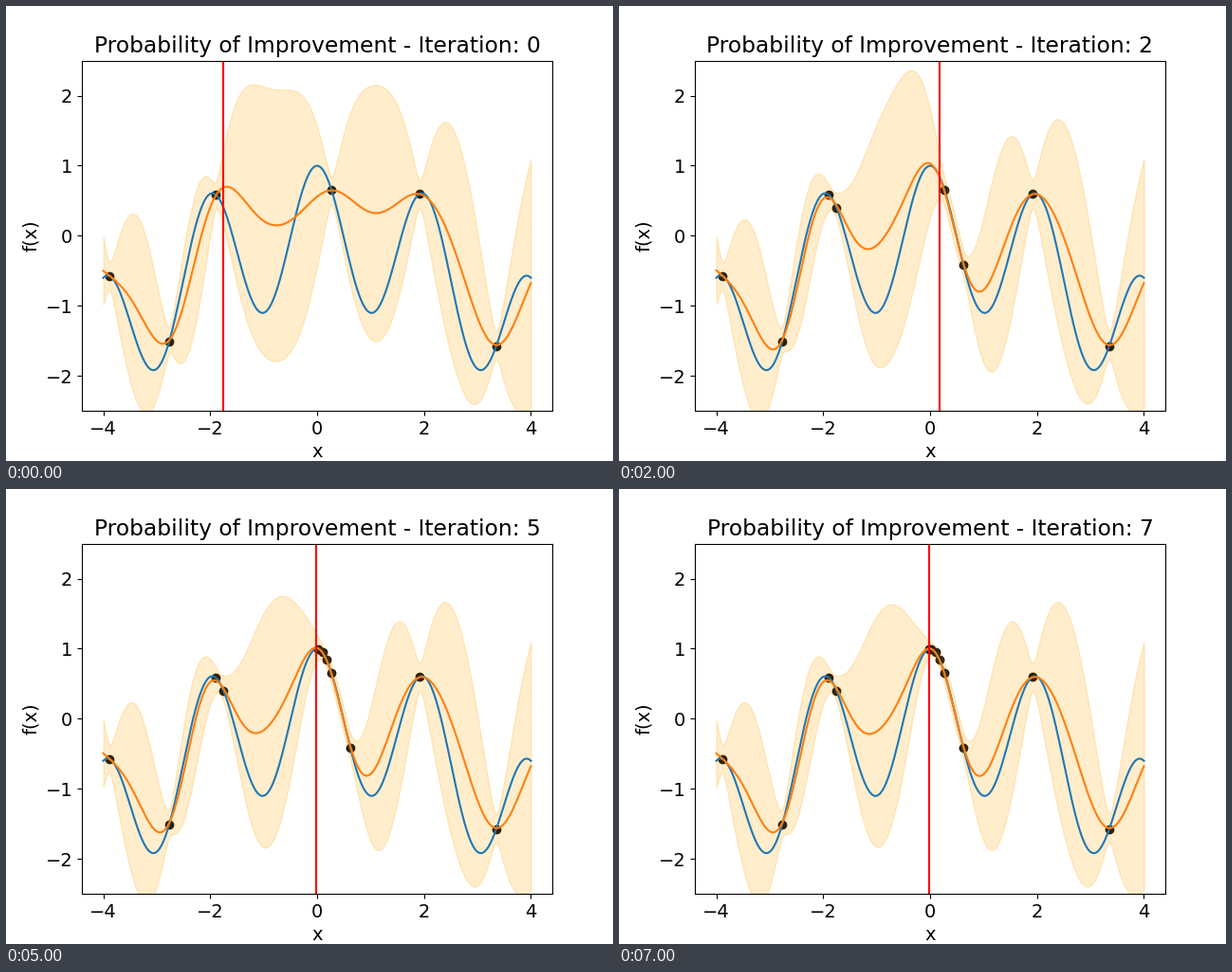
A matplotlib script that plays this animation: 640x480 px, repeating every 8000 ms.

```python
import matplotlib.pyplot as plt
import numpy as np
from matplotlib.animation import FuncAnimation

STEPS = 8
LENGTH, NOISE, MARGIN = 0.5, 0.01, 0.01

plt.rcParams.update({"font.family": "DejaVu Sans", "font.size": 14})


def objective(x):
    return np.cos(np.pi * x) - 0.1 * x**2


def kernel(a, b):
    return np.exp(-((a[:, None] - b[None, :]) ** 2) / (2 * LENGTH**2))


def posterior(xs, ys, grid):
    """Mean and variance of the Gaussian process on the grid."""
    cov = kernel(xs, xs) + NOISE * np.eye(len(xs))
    cross = kernel(xs, grid)
    mean = cross.T @ np.linalg.solve(cov, ys)
    var = 1 - np.sum(cross * np.linalg.solve(cov, cross), axis=0)
    return mean, var


def optimise(grid):
    """Run the search and keep what each step needs for drawing."""
    rng = np.random.RandomState(12)
    xs = rng.uniform(-4, 4, 6)
    history = []
    for _ in range(STEPS):
        ys = objective(xs)
        mean, var = posterior(xs, ys, grid)
        # The normal CDF is monotonic, so its argument is enough.
        pick = grid[np.argmax((mean - ys.max() - MARGIN) / var)]
        history.append((xs, ys, mean, 1.96 * np.sqrt(var), pick))
        xs = np.append(xs, pick)
    return history


grid = np.linspace(-4, 4, 200)
history = optimise(grid)
fig, ax = plt.subplots(figsize=(6.4, 4.8), dpi=100)


def draw(step):
    xs, ys, mean, band, pick = history[step]
    ax.clear()
    ax.scatter(xs, ys, color="black")
    ax.plot(grid, objective(grid), color="C0")
    ax.plot(grid, mean, color="C1")
    ax.fill_between(grid, mean - band, mean + band, color="orange", alpha=0.2)
    ax.axvline(pick, color="red")
    ax.set_xlim(-4.4, 4.4)
    ax.set_ylim(-2.5, 2.5)
    ax.set_xlabel("x")
    ax.set_ylabel("f(x)")
    ax.set_title(f"Probability of Improvement - Iteration: {step}")
    return []


anim = FuncAnimation(fig, draw, frames=STEPS, init_func=lambda: draw(0),
                     interval=1000, repeat=True, repeat_delay=0)
plt.show()
```
